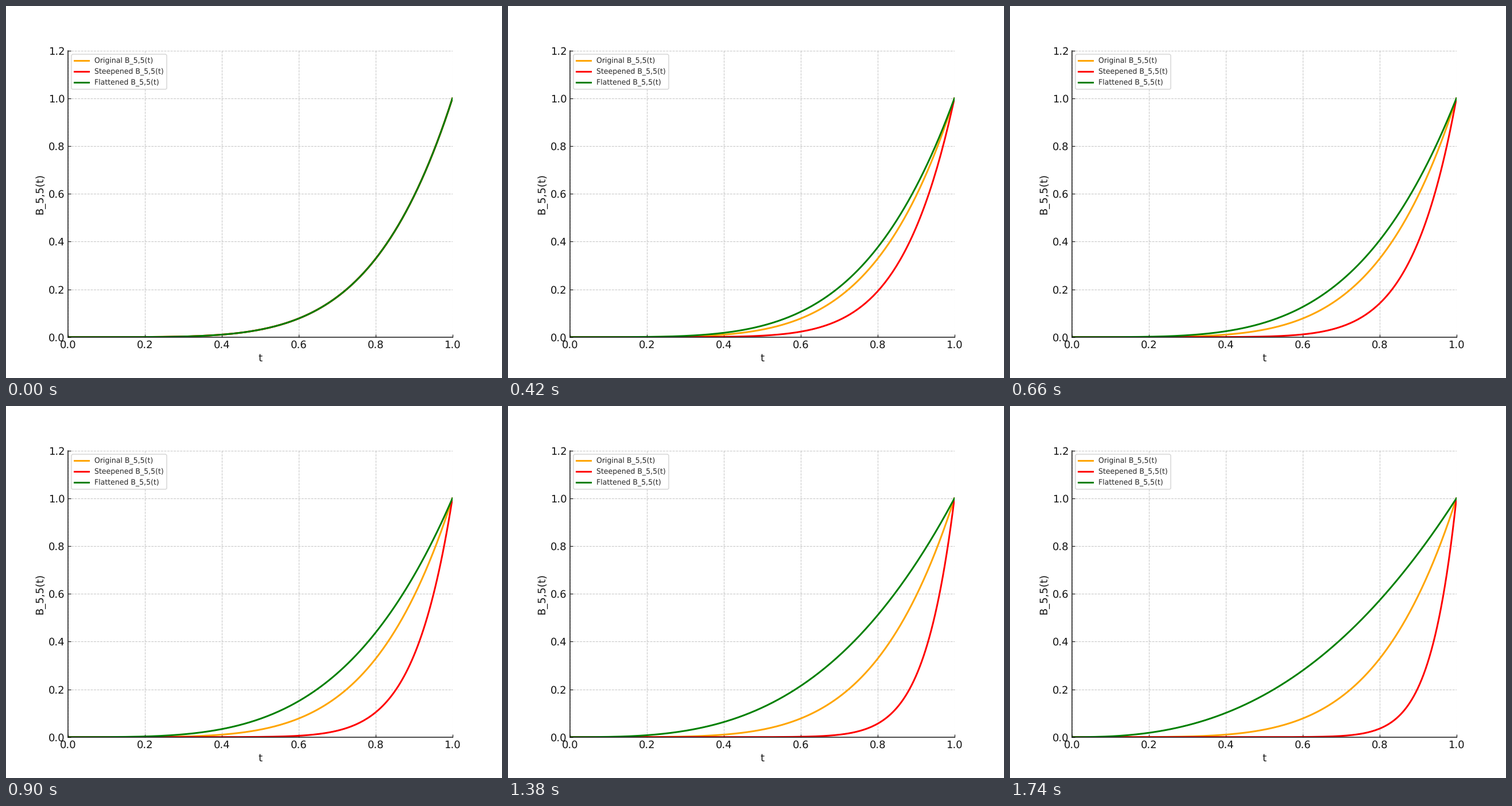
Write a matplotlib script that moves like this. It is 864 by 648 pixels and loops after 1.8 s.

```python
import numpy as np
import matplotlib.pyplot as plt
from matplotlib.animation import FuncAnimation

FRAMES = 30
INTERVAL = 60
DEGREE = 5
INK = "#141414"

plt.rcParams.update({
    "font.family": "DejaVu Sans",
    "font.size": 10,
    "text.hinting": "none",
    "text.color": "#262626",
    "axes.labelsize": "large",
    "axes.labelcolor": INK,
    "axes.edgecolor": INK,
    "axes.linewidth": 1.0,
    "axes.spines.top": False,
    "axes.spines.right": False,
    "xtick.direction": "in",
    "ytick.direction": "in",
    "xtick.labelsize": "large",
    "ytick.labelsize": "large",
    "xtick.color": INK,
    "ytick.color": INK,
    "grid.color": "#b0b0b0",
    "grid.linestyle": "--",
    "grid.linewidth": 0.7,
    "grid.alpha": 0.7,
    "legend.fontsize": "small",
})

fig, ax = plt.subplots(figsize=(8, 6), dpi=108)
ax.set(xlim=(0, 1), ylim=(0, 1.2), xlabel="t", ylabel="B_5,5(t)")
ax.grid(True)

t = np.linspace(0, 1, 200)


def curve(label, color):
    line, = ax.plot(t, t ** DEGREE, color=color, lw=2, label=f"{label} B_5,5(t)")
    return line


curve("Original", "orange")
steep = curve("Steepened", "red")
flat = curve("Flattened", "green")
ax.legend(loc="upper left")


def update(i):
    p = i / (FRAMES - 1)
    steep.set_ydata(t ** (DEGREE * (1 + 2 * p)))
    flat.set_ydata(t ** (DEGREE * (1 - 0.5 * p)))
    return steep, flat


anim = FuncAnimation(fig, update, frames=FRAMES, interval=INTERVAL,
                     repeat=True, repeat_delay=0)
plt.show()
```
